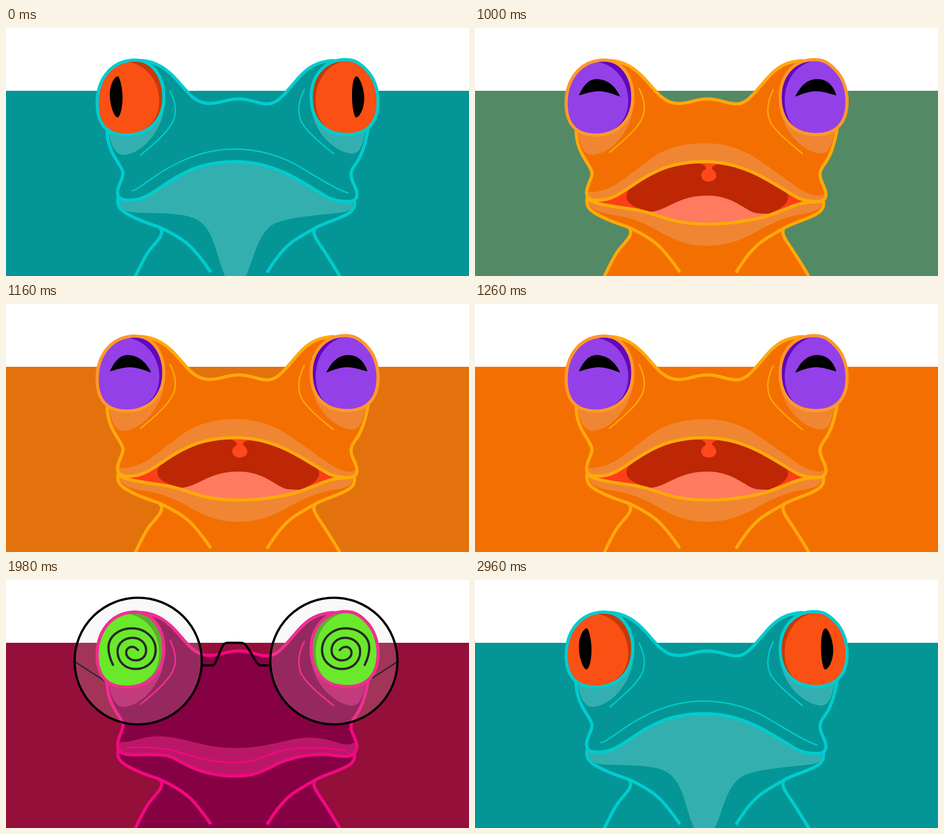
These frames come from a looping animation (1021 px wide and 549 px high, 3620 ms). An HTML page:

```html
<!DOCTYPE html>
<html lang="en">
<head>
<meta charset="utf-8">
<title>Frog</title>
<style>
html, body { margin: 0; width: 100%; height: 100%; overflow: hidden; background: #fff; }
svg { display: block; width: 100%; height: 100%; }
.calm  { --skin: #049696; --line: #00cccf; --rim: #00cccf; --pale: #34afaf; --eye: #fb5013; --shade: #c53a0a; }
.happy { --skin: #f46f02; --line: #ffa90a; --rim: #ff9829; --pale: #f08631; --eye: #9340e8; --shade: #6307be; }
.dizzy { --skin: #860044; --line: #f20880; --rim: #f20880; --pale: #bb1768; --eye: #50ea04; --shade: #3fa30a; }
.skin { fill: var(--skin); }
.pale { fill: var(--pale); }
.eye { fill: var(--eye); }
.shade { fill: var(--shade); }
.line, .thin, .rim, .wire { fill: none; stroke: var(--line); stroke-width: 7; stroke-linecap: round; stroke-linejoin: round; }
.thin { stroke-width: 3; }
.dizzy .thin { stroke-width: 3.5; }
.rim { stroke: var(--rim); }
.wire { stroke: #000; stroke-width: 5; }
.lens { fill: rgba(222, 222, 222, .18); stroke: none; }
</style>
</head>
<body>
<svg id="stage" viewBox="0 0 1021 549" preserveAspectRatio="none"></svg>
<script>
const LOOP = 3620, FADE = 350, TICK = 20;
const TEAL = [4, 150, 150], ORANGE = [244, 111, 2], WINE = [134, 0, 68];

const path = (cls, d, more = '') => `<path class="${cls}" d="${d}" ${more}/>`;

// Outline pieces, clockwise from the left eye
const crown = 'C331 75 351 89 368 106 C382 120 392 134 407 149 C421 161 432 167 450 167 C472 167 487 157 514 157 C540 157 556 168 576 168 C593 168 604 157 616 144 C630 129 641 114 653 102 C673 82 693 74 722 72';
const cheekR = 'C794 246 790 268 778 290 C770 304 760 312 761 326 C762 342 773 352 774 367';
const jawR = 'C770 395 767 400 760 407 C742 421 710 428 685 441';
const legR = 'C680 443 679 447 679 452 C679 462 690 476 700 491 C712 510 724 528 735 548';
const legL = 'C294 532 301 516 311 500 C320 485 326 482 337 467 C345 456 347 444 333 439';
const jawL = 'C305 430 280 420 260 407 C248 398 245 390 247 377';
const cheekL = 'C246 349 258 334 258 322 C258 313 247 299 238 283 C229 267 223 250 223 226';

const skin = `M300 72${crown}L799 222${cheekR}L768 382${jawR}${legR}V552H286V548${legL}${jawL}L246 364${cheekL}Z`;
const outline = `M300 72${crown}M799 222${cheekR}M768 382${jawR}${legR}M286 548${legL}${jawL}M246 364${cheekL}`
  + 'M336 440C365 453 395 470 413 490 C427 506 440 523 450 538'
  + 'M685 441C662 454 643 464 628 476 C608 492 590 518 577 539';

// Lips
const upper = 'C320 380 350 335 420 309 C450 299 475 296 505 296 C545 296 580 304 620 323 C650 337 690 364 712 376 C730 384 745 384 758 384';
const upperLip = `M246 364C246 378 256 382 276 381${upper}C770 383 774 377 774 367`;
const lower = 'C750 385 735 385 722 388 C694 393 672 411 622 422 C586 429 555 434 513 434 C480 434 455 431 430 424 C400 416 382 406 340 400 C300 394 262 390 247 377';
const mouth = `M276 381${upper}L760 384${lower}Z`;

// Eyes
const eyeL = 'M282 71C323 69 348 108 348 153 C348 205 313 237 266 237 C219 237 201 208 201 167 C201 113 232 73 282 71Z';
const eyeR = 'M745 70C768 69 781 78 794 92 C812 110 820.5 136 820.5 163 C820.5 205 800 236 752 236 C703 236 673 205 673 153 C673 108 700 72 745 70Z';
const glowL = 'M258 74C312 76 338 122 338 160 C338 190 325 210 311 220 C299 230 284 237 266 237 C219 237 201 208 201 167 C201 118 225 80 258 74Z';
const glowR = 'M758 71C708 75 683 118 683 160 C683 190 695 212 709 222 C722 231 735 236 752 236 C800 236 820.5 205 820.5 163 C820.5 136 812 110 794 92 C784 80 772 72 758 71Z';
const bags = 'M226 222C228 250 238 281 259 281 C300 279 343 228 348 180Z'
  + 'M674 180C680 235 730 278 764 278 C786 276 786 250 796 222Z';
const foldL = 'M362 134C374 159 378 181 367 203 C355 226 327 250 297 275';
const foldR = 'M658 136C645 160 642 187 651 207 C660 226 690 252 722 278';

const frog = (cls, { back = '', face, lips, pupils, front = '', foldY = 0 }) => `
<g class="${cls}" display="none">${back}
${path('skin', skin)}${path('pale', bags)}${face}
${path('line', outline + lips)}
${path('thin', foldL, `transform="translate(0 ${foldY})"`)}${path('thin', foldR)}
${path('shade', eyeL + eyeR)}${path('eye', glowL + glowR)}${path('rim', eyeL + eyeR)}
${pupils}${front}</g>`;

const calm = frog('calm', {
  foldY: 6,
  face: path('pale', `M276 381${upper}L764 387C767 401 755 407 735 409 C680 415 612 420 587 436 C555 457 546 512 529 549 H483 C466 512 462 465 438 438 C423 420 400 414 360 411 C330 409 305 410 280 408 C258 407 248 394 249 380Z`)
    + path('thin', 'M278 360C290 360 326 326 365 306 C410 281 455 268 504 268 C550 268 600 280 640 303 C685 329 725 356 754 365'),
  lips: upperLip,
  pupils: path('', 'M247 107C250 107 257 130 257 155 C257 178 251 198 246 198 C239 198 229 172 229 148 C229 125 239 107 247 107Z'
    + 'M773 107C779 107 790 133 790 155 C790 180 779 198 772 198 C768 198 763 175 763 150 C763 125 767 107 773 107Z')
});

const happy = frog('happy', {
  face: path('pale', 'M247 360C256 367 290 362 322 339 C360 313 390 282 424 269 C450 259 480 255 508 255 C555 255 592 269 628 294 C672 323 705 352 735 366 C750 372 765 373 772 367 L766 386'
    + 'C764 403 745 408 725 411 C695 416 660 428 622 450 C590 469 555 482 511 482 C470 482 438 470 400 447 C372 431 345 420 308 414 C278 409 252 404 248 380Z')
    + path('', mouth, 'fill="#ff3e17"')
    + '<g clip-path="url(#mouth)">'
    + path('', 'M354 346C330 359 328 380 345 391 C358 399 372 405 386 407 L510 440 L648 411 C672 402 694 388 690 371 C686 360 676 354 662 346 L600 280 H420Z', 'fill="#be2704"')
    + path('', 'M385 407C425 405 445 371 512 371 C570 371 592 402 617 409 C627 411 640 411 648 411 V445 H385Z', 'fill="#ff7a5e"')
    + path('', 'M494 299C503 302 512 307 508 313 C500 317 499 323 499 327 C500 336 507 340 515 340 C524 340 532 335 532 327 C532 319 526 314 523 312 C521 307 528 303 538 301Z', 'fill="#ff481c"')
    + '</g>',
  lips: `${upperLip}M760 384${lower}`,
  pupils: path('', 'M229 149C240 125 252 113 268 113 C295 113 312 133 320 152 C307 147 290 140 272 140 C252 141 240 147 229 149Z'
    + 'M706 152C716 132 730 113 755 113 C778 113 791 130 797 149 C785 147 770 140 752 140 C735 140 720 147 706 152Z')
});

const spiral = 'M236 188C231 178 226 165 226 150 C226 124 250 107 278 107 C306 107 330 127 330 155 C330 180 310 197 286 197 C262 197 246 180 246 158 C246 140 261 128 279 128 C297 128 309 140 309 156 C309 169 299 178 286 178 C274 178 265 170 265 161 C265 153 271 148 278 148 C284 148 287 151 291 155';
const ring = (cls, x) => `<circle class="${cls}" cx="${x}" cy="179.5" r="140.3"/>`;

const dizzy = frog('dizzy', {
  back: path('wire', 'M152 181L217 223M863 181L808 217', 'style="stroke-width:3"'),
  face: path('pale', 'M247 358C275 362 300 346 333 346 C395 346 430 372 507 372 C580 372 620 349 672 349 C715 349 735 366 755 364 C762 364 768 360 771 356'
    + 'L774 367C774 380 766 389 752 390 C735 392 720 386 700 386 C675 386 645 389 610 402 C575 416 560 434 507 434 C410 434 385 393 350 388 C325 385 310 387 280 387 C256 387 246 380 246 364Z')
    + path('thin', 'M269 371C330 368 360 374 390 384 C430 396 465 404 505 404 C545 404 560 394 595 382 C640 367 710 370 747 378'),
  lips: 'M246 364C246 380 256 387 280 387 C310 387 325 385 350 388 C385 393 410 434 507 434 C560 434 575 416 610 402 C645 389 675 386 700 386 C720 386 735 392 752 390 C766 389 774 380 774 367',
  pupils: path('wire', spiral) + path('wire', spiral, 'transform="translate(1027 0) scale(-1 1)"'),
  front: ring('lens', 291.5) + ring('lens', 723) + ring('wire', 291.5) + ring('wire', 723)
    + path('wire', 'M432 189H453C460 189 461 185 464 178L474 154C478 144 481 139 489 139H517C525 139 528 143 533 150C545 167 552 189 562 189H583')
});

const stage = document.getElementById('stage');
stage.innerHTML = `<clipPath id="mouth"><path d="${mouth}"/></clipPath>
<rect id="ground" y="139" width="1021" height="410"/>${calm}${happy}${dizzy}`;
const ground = document.getElementById('ground');
const poses = ['calm', 'happy', 'dizzy'].map(c => stage.querySelector('.' + c));

// at: pose change, from: fade start, hold: time the fade stops
const scenes = [
  { at: 0, from: -FADE, hold: LOOP, pose: 0, a: WINE, b: TEAL },
  { at: 940, from: 924, hold: LOOP, pose: 1, a: TEAL, b: ORANGE },
  { at: 1780, from: 1780, hold: 1980, pose: 2, a: ORANGE, b: WINE },
  { at: 2640, from: 2624, hold: LOOP, pose: 0, a: WINE, b: TEAL }
];

// Same curve as the CSS "ease" keyword
function ease(x) {
  if (x <= 0) return 0;
  if (x >= 1) return 1;
  const curve = (u, p, q) => 3 * p * u * (1 - u) ** 2 + 3 * q * u * u * (1 - u) + u ** 3;
  let lo = 0, hi = 1;
  for (let i = 0; i < 24; i++) {
    const mid = (lo + hi) / 2;
    if (curve(mid, .25, .25) < x) lo = mid; else hi = mid;
  }
  return curve(lo, .1, 1);
}

function draw(now) {
  const t = Math.floor((now % LOOP) / TICK) * TICK;
  const s = scenes.filter(k => k.at <= t).pop();
  const k = ease((Math.min(t, s.hold) - s.from) / FADE);
  const rgb = s.a.map((v, i) => Math.round(v + (s.b[i] - v) * k));
  ground.setAttribute('fill', `rgb(${rgb})`);
  poses.forEach((g, i) => g.setAttribute('display', i === s.pose ? 'inline' : 'none'));
}

const start = performance.now();
function loop() {
  draw(performance.now() - start);
  requestAnimationFrame(loop);
}
loop();
</script>
</body>
</html>
```
